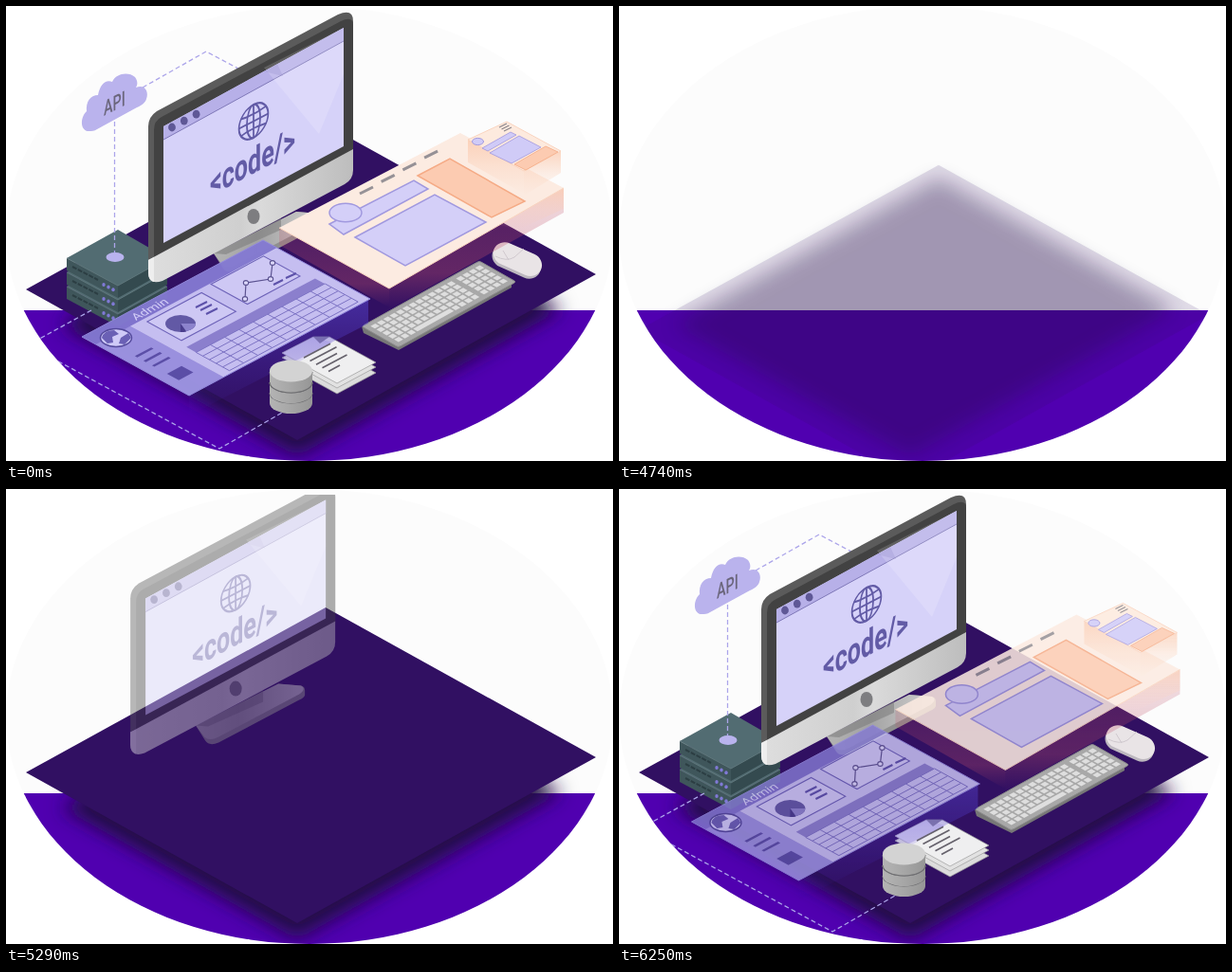
Recreate the animation shown at these times as an HTML page. Size 640 by 480 pixels, loop 6.32 s.

```html
<!DOCTYPE html>
<html lang="en">
<head>
<meta charset="utf-8">
<title>Isometric workspace</title>
<style>
  html, body { margin: 0; width: 100%; height: 100%; overflow: hidden; background: #fff; }
  svg { display: block; width: 100vw; height: 100vh; }
  text { font-family: Roboto, "Liberation Sans", sans-serif; }
  .flat * { vector-effect: non-scaling-stroke; }
</style>
</head>
<body>
<svg id="stage" viewBox="0 0 640 480" preserveAspectRatio="none"></svg>
<script>
const LOOP = 6320, FADE = 3720, BUILD = 4660;

// Build-up timing: [start ms, end ms, pictures in between]
const STEPS = [[4660, 4860, 3], [4860, 5290, 8], [5290, 5700, 6], [5700, 6250, 8], [6250, 6320, 1]];
const LAST = 26, RISE = 7;

// Each part: first step, starting offset
const PARTS = {
  platform: [0, 0, 50],
  monitor: [8, -33, -20],
  servers: [14, 33, -18],
  cloud: [14, 0, -54],
  docs: [14, -25, -20],
  disk: [14, -33, -18],
  keyboard: [14, -33, -18],
  mouse: [14, -25, -19],
  lines: [17, 0, 0],
  admin: [19, -25, 14],
  site: [19, 24, -11]
};

const poly = (points, fill, more = '') => `<polygon points="${points}" fill="${fill}" ${more}/>`;
const path = (d, fill, more = '') => `<path d="${d}" fill="${fill}" ${more}/>`;
const line = (d, color, width = 1, more = '') => path(d, 'none', `stroke="${color}" stroke-width="${width}" ${more}`);
const oval = (x, y, rx, ry, fill, more = '') => `<ellipse cx="${x}" cy="${y}" rx="${rx}" ry="${ry}" fill="${fill}" ${more}/>`;
const rect = (x, y, w, h, fill, more = '') => `<rect x="${x}" y="${y}" width="${w}" height="${h}" fill="${fill}" ${more}/>`;
const flat = (matrix, body) => `<g class="flat" transform="matrix(${matrix})">${body}</g>`;
const part = (id, body) => `<g id="${id}">${body}</g>`;
const times = (n, draw) => Array.from({ length: n }, (_, i) => draw(i)).join('');
const gradient = (id, dir, stops) => `<linearGradient id="${id}" ${dir}>` +
  stops.map(([at, color, alpha = 1]) => `<stop offset="${at}" stop-color="${color}" stop-opacity="${alpha}"/>`).join('') +
  '</linearGradient>';
const DOWN = 'x1="0" y1="0" x2="0" y2="1"';
const ACROSS = 'x1="0" y1="0" x2="1" y2="0"';

const defs = `<defs>
  <clipPath id="round"><ellipse cx="320" cy="240" rx="320" ry="240"/></clipPath>
  <clipPath id="top"><rect y="6" width="640" height="474"/></clipPath>
  <clipPath id="sky"><path d="M0 118L137 43V52H640V480H0Z"/></clipPath>
  <filter id="soft" x="-20%" y="-20%" width="140%" height="140%"><feGaussianBlur stdDeviation="10"/></filter>
  ${gradient('chin', ACROSS, [[0, '#dedede'], [.45, '#cfcfcf'], [.55, '#dadada'], [1, '#bdbdbd']])}
  ${gradient('foot', ACROSS, [[0, '#b4b4b4'], [.4, '#a2a2a2'], [1, '#d2d2d2']])}
  ${gradient('band', ACROSS, [[0, '#b4b4b4'], [.5, '#a6a6a6'], [1, '#969696']])}
  ${gradient('peach', DOWN, [[0, '#fbc9ad', .75], [.5, '#fbc9ad', .3], [1, '#fbc9ad', 0]])}
  ${gradient('ember', DOWN, [[0, '#c0506a', .2], [.7, '#c0506a', .35], [1, '#c0506a', 0]])}
  ${gradient('lilac', DOWN, [[0, '#5a48d8', .5], [1, '#4b30c8', 0]])}
</defs>`;

const platform = poly('21,299 337,125 622,283 307,458', '#311062');

function servers() {
  const box = i => {
    const y = 30 - i * 15;
    const leds = times(3, k => oval(103 + k * 5, 294 + k * 2.6, 1.7, 2, '#8079d6'));
    return `<g transform="translate(0 ${y})">` +
      poly('64,266 118,295 118,308 64,279', '#3f565b') +
      poly('118,295 170,266 170,279 118,308', '#344a4f') +
      poly('64,266 118,236 170,266 118,295', '#526c72') +
      line('M64 266L118 295L170 266', '#62797e', .8) +
      line('M70 275L97 289', '#2c3e43', 2, 'stroke-dasharray="5 1.5"') + leds + '</g>';
  };
  return times(3, box);
}

const dash = 'stroke-dasharray="5 3"';
const lines = ['M114.500 122V262', 'M144 86L211 48L258 73', 'M90 321L30 354', 'M48 371L225 467L298 425']
  .map(d => line(d, '#aca5ea', 1.3, dash)).join('') + oval(115, 265, 9.5, 5, '#b9b3ee');

const cloud = path('M88 132C79 133 77 119 85 111C84 101 89 94 97 94C99 83 105 77 112 80' +
  'C116 71 129 69 136 75C139 79 139 83 137 86C146 82 151 90 148 98C147 102 143 105 138 107L96 130C93 132 90 132 88 132Z', '#bab3ed') +
  '<text transform="matrix(.65 -.33 0 1 103 116)" font-size="22" font-weight="500" fill="#6b667c">API</text>';

function monitor() {
  const globe = '<g transform="matrix(.88 -.46 0 1 261 121.500)" fill="none" stroke="#625ba6" stroke-width="2">' +
    '<circle r="17.500"/><ellipse rx="8" ry="17.500"/><path d="M0 -17V17M-17.500 0H17.500M-15 -9Q0 -6 15 -9M-15 9Q0 6 15 9"/></g>';
  const dots = times(3, i => oval(175 + i * 12.8, 128 - i * 6.9, 3.9, 4.4, '#5f5896'));
  return path('M219 261L306 217L330 219Q334 220 334 224V229Q333 232 328 234L243 279Q233 283 229 277Z', '#8f8f8f') +
    path('M219 261L306 217L330 219Q336 222 328 228L243 273Q233 278 228 273Z', 'url(#foot)') +
    path('M219 261L290 220V236L232 262Z', '#777', 'opacity=".5"') +
    path('M150 268V127Q150 117 159 111L350 9Q366 2 366 16V153Z', '#5b5b5b') +
    path('M156 265V131Q156 121 164 117L353 16Q366 10 366 20V153Z', '#424242') +
    path('M150 268L366 151V173Q366 183 357 188L165 290Q150 295 150 281Z', 'url(#chin)') +
    path('M150 268L156 265V291Q150 289 150 281Z', '#eee') +
    poly('166,127 356,23 356,148 166,250', '#d6d2f9') +
    poly('166,127 356,23 356,37 166,141', '#b7b0e8') +
    line('M166 141L356 37', '#7f78b8', 1) +
    poly('272,65 330,135 356,72 356,23', '#fff', 'opacity=".16"') +
    poly('272,69 286,61 292,74', '#8e87c8', 'opacity=".25"') +
    dots + globe + oval(261, 222, 6.5, 8, '#7d7d80') +
    '<text transform="matrix(.66 -.35 0 1 215 201)" font-size="38" font-weight="600" fill="#625ba6">&lt;code/&gt;</text>';
}

function docs() {
  const sheet = (y, fill) => `<g transform="translate(0 ${y})">` +
    poly('291,366 324,349 341,349 390,376 349,398', fill, 'stroke="#9c9c9c" stroke-width=".7"') + '</g>';
  const rows = [28, 28, 22, 26, 12];
  return sheet(11, '#dcdcdc') + sheet(5, '#e2e2e2') + sheet(0, '#efeff0') +
    poly('291,366 324,349 344,355 308,376', '#c5bdf0', 'opacity=".5"') +
    poly('324,349 341,349 331,356', '#8a85a0') +
    rows.map((w, i) => line(`M${314 + i * 6.5} ${371 + i * 3.6}l${w} ${-w * .53}`, '#66626c', 1.7)).join('');
}

function disk() {
  const band = i => {
    const y = 419 - i * 11;
    return path(`M278 ${y - 11}V${y}A22.500 11 0 0 0 323 ${y}V${y - 11}Z`, 'url(#band)') +
      line(`M278 ${y - 11}A22.500 11 0 0 0 323 ${y - 11}`, '#6f6f72', 1.2);
  };
  return times(3, band) + path('M278 385V397A22.500 11 0 0 0 323 397V385Z', 'url(#band)') +
    line('M278 397A22.500 11 0 0 0 323 397', '#6f6f72', 1.2) + oval(300.5, 385, 22.5, 11.5, '#d3d3d3');
}

function keyboard() {
  const key = (r, c) => rect(4 + c * 5.4 + (c > 12 ? 2.5 : 0), 4.5 + r * 6.4, 4, 4.8, '#dedede');
  const keys = times(5, r => times(17, c => r === 4 && c > 2 && c < 9 ? '' : key(r, c)));
  return path('M375 338L414 357L533 292V297L414 363L377 345Z', '#777') +
    flat('1.240 -.690 .970 .550 375 338', rect(0, 0, 100, 40, '#a8a8a8', 'rx="2" stroke="#8b8b8b" stroke-width="1"') +
      keys + rect(20.2, 30.1, 31, 4.8, '#dedede'));
}

const mouse = '<g transform="translate(539 268) rotate(24)">' +
  '<rect x="-27" y="-10" width="54" height="24" rx="13" fill="#bdb8bf"/>' +
  '<rect x="-27" y="-13" width="54" height="24" rx="13" fill="#e9e4e6"/></g>' +
  line('M516 264Q528 270 536 265L546 256M530 268L524 258', '#c9c2c8', .8);

function admin() {
  const edge = 'stroke="#7168bd" stroke-width="1.100"';
  const grid = times(10, i => `M${24 + i * 7.9} 66V97`) + times(6, i => `M24 ${66 + i * 6.2}H95`);
  const board = rect(0, 0, 100, 100, '#8479d2') + rect(0, 13, 19, 87, '#9f96e3') +
    rect(19, 13, 81, 87, '#cbc6f6') + rect(0, 0, 100, 100, 'none', 'stroke="#938add" stroke-width="1"') +
    rect(26, 17, 30, 32, '#d5d1fa', edge) + rect(63, 14, 29, 34, '#d5d1fa', edge) +
    rect(24, 57, 71, 9, '#8f85d2') + line(grid, '#8078c8', 1) +
    times(3, i => rect(5, 41 + i * 8, 9, 2.2, '#5d52aa')) +
    rect(5, 71, 8, 11, '#5d52aa');
  const points = [[252, 309], [253, 292], [279, 288], [281, 271]];
  return poly('193,411 382,310 382,335 193,432', 'url(#lilac)') +
    flat('1.910 -1.020 1.130 .620 80 349', `<g opacity=".96">${board}</g>`) +
    oval(116, 350, 16.5, 9.5, '#cfcaf7', 'stroke="#544a9c" stroke-width="1.500"') +
    path('M101 350Q103 342 114 342L119 346L112 349L113 355L107 356ZM121 350L129 345L132 350L125 357L119 356Z', '#6a60b5') +
    '<text transform="matrix(.88 -.47 .65 .550 137 332)" font-size="14" fill="#d5d0f8">Admin</text>' +
    oval(184, 335, 16, 9, '#6259a5') + path('M184 335L200 335A16 9 0 0 1 190 343Z', '#8c83cc') +
    path('M184 335L190 343.400A16 9 0 0 1 184 344Z', '#493d8c') +
    line('M200 318L212 312M205 321L217 315M211 325L223 319', '#5d52aa', 2) +
    line('M282 294L292 289M295 287L306 282', '#5d52aa', 2) +
    line('M' + points.join('L'), '#5b5290', 1.2) +
    points.map(([x, y]) => oval(x, y, 2.7, 2.4, '#dcd8fb', 'stroke="#5b5290" stroke-width="1.100"')).join('');
}

function site() {
  const violet = 'stroke="#a199df" stroke-width="1.500"', orange = 'stroke="#f5ab86" stroke-width="1.500"';
  return poly('288,234 404,298 404,318 288,252', 'url(#ember)') +
    poly('404,298 588,192 588,218 404,320', 'url(#ember)') +
    poly('520,231 588,192 588,214 540,236', 'url(#peach)') +
    poly('288,234 479,134 588,192 404,298', '#fcebe1') +
    line('M288 234L404 298L588 192', '#f8d3be', 1) +
    poly('434,179 468,161 547,206 512,223', '#fccbb1', orange) +
    poly('368,244 452,199 506,228 421,274', '#d4cff8', violet) +
    poly('341,230 430,184 445,193 356,241', '#d4cff8', violet) +
    oval(358, 218, 17, 9.8, '#d4cff8', violet) +
    times(4, i => line(`M${373 + i * 22.7} ${198 - i * 12.6}l14 -7`, '#969196', 3)) +
    poly('487,141 546,174 546,198 487,165', 'url(#peach)') +
    poly('546,174 585,153 585,176 546,200', 'url(#peach)') +
    poly('487,141 528,122 585,153 546,174', '#fdeade', 'stroke="#f9cdb5" stroke-width=".8"') +
    poly('502,150 532,133 538,136 508,153', '#d0cbf7', 'stroke="#a199df" stroke-width=".8"') +
    poly('510,155 541,137 564,149 533,166', '#d0cbf7', 'stroke="#a199df" stroke-width=".8"') +
    poly('536,167 569,148 582,154 548,173', '#fccbb1', 'stroke="#f5ab86" stroke-width=".8"') +
    oval(497.5, 143, 6, 3.6, '#d0cbf7', 'stroke="#a199df" stroke-width="1"') +
    line('M520 128l8 -4M522.500 130l8 -4M525 132l8 -4', '#8c868c', 1.2);
}

document.getElementById('stage').innerHTML = defs + '<g clip-path="url(#round)">' +
  rect(0, 0, 640, 480, '#fcfcfc') + rect(0, 321, 640, 159, '#5000b0') +
  '<g id="scene">' +
  part('shade', poly('58,336 337,182 586,320 307,475', '#230c44', 'filter="url(#soft)"')) +
  part('platform', platform) +
  part('servers', servers()) + part('lines', lines) +
  `<g clip-path="url(#sky)">${part('cloud', cloud)}</g>` +
  `<g clip-path="url(#top)">${part('monitor', monitor())}</g>` +
  part('docs', docs()) + part('keyboard', keyboard()) + part('mouse', mouse) +
  part('admin', admin()) + part('disk', disk()) + part('site', site()) + '</g></g>';

const get = id => document.getElementById(id);
const clamp = v => Math.min(1, Math.max(0, v));

function stepAt(t) {
  if (t < BUILD) return LAST;
  let n = 0;
  for (const [from, to, count] of STEPS) {
    if (t < to) return n + Math.floor((t - from) / (to - from) * count + 1e-6);
    n += count;
  }
  return LAST;
}

function draw(t) {
  const n = stepAt(t);
  const fading = t >= FADE && t < BUILD;
  const gone = fading ? Math.min(16, Math.floor((t - FADE) / 40) + 1) / 17 : 0;
  get('scene').setAttribute('opacity', 1 - gone);
  get('shade').setAttribute('opacity', clamp(n / 3));
  for (const id in PARTS) {
    const [start, dx, dy] = PARTS[id];
    const p = clamp((n - start) / RISE);
    const el = get(id);
    el.setAttribute('opacity', p);
    el.setAttribute('transform', `translate(${dx * (1 - p)} ${dy * (1 - p)})`);
  }
}

const begin = performance.now();
function tick() {
  draw((performance.now() - begin) % LOOP);
  requestAnimationFrame(tick);
}
tick();
</script>
</body>
</html>
```
